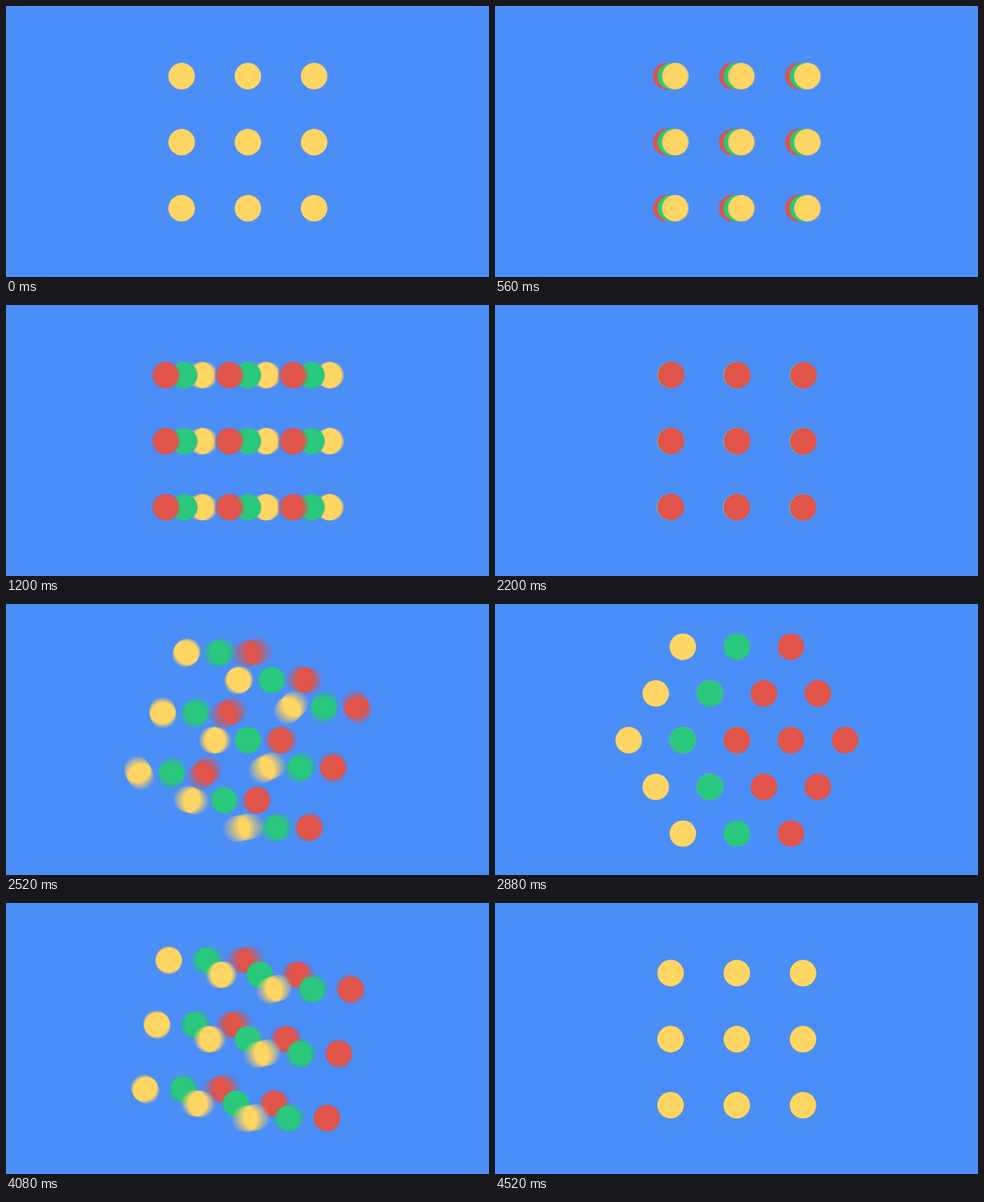
Write an HTML page with a canvas that moves like this. It is 640 px wide and 360 px high and loops after 4.84 s.

```html
<!DOCTYPE html>
<html lang="en">
<head>
<meta charset="utf-8">
<title>Turning cube of dots</title>
<style>
  html, body { margin: 0; width: 100%; height: 100%; overflow: hidden; background: #4c8ef8; }
  canvas { display: block; width: 640px; height: 360px; }
</style>
</head>
<body>
<canvas id="stage" width="640" height="360"></canvas>
<script>
const W = 640, H = 360;
const LOOP = 4840, STEP = 40;
const CENTER_X = 320.5, CENTER_Y = 180.9;
const EDGE = 87.75, RADIUS = 17.6;
const BACKGROUND = '#4c8ef8';
const LAYER_COLORS = ['#ffd564', '#2ac87c', '#e0544a'];
const SAMPLES = 9, SHUTTER = 27;
const ISO = Math.atan(Math.SQRT2);

// Each move eases around its middle time, in ms.
const MOVES = [
  { mid: 950, length: 1430, turn: Math.PI, roll: 0 },
  { mid: 2510, length: 880, turn: ISO, roll: Math.PI / 4 },
  { mid: 3993, length: 1300, turn: Math.PI - ISO, roll: Math.PI / 4 }
];

const stage = document.getElementById('stage').getContext('2d');
const layer = document.createElement('canvas');
layer.width = W;
layer.height = H;
const scene = layer.getContext('2d');

function ease(u) {
  if (u <= 0) return 0;
  if (u >= 1) return 1;
  return u < 0.5 ? (2 * u) ** 4 / 2 : 1 - (2 - 2 * u) ** 4 / 2;
}

function poseAt(time) {
  let turn = -Math.PI, roll = Math.PI / 2;
  for (const move of MOVES) {
    const p = ease((time - move.mid) / move.length + 0.5);
    turn += move.turn * p;
    roll -= move.roll * p;
  }
  return { turn, roll };
}

// Projects a 3 x 3 x 3 lattice without perspective, nearest dots last.
function projectDots({ turn, roll }) {
  const st = Math.sin(turn), ct = Math.cos(turn);
  const sr = Math.sin(roll), cr = Math.cos(roll);
  const dots = [];
  for (let n = -1; n <= 1; n++) {
    for (let a = -1; a <= 1; a++) {
      for (let b = -1; b <= 1; b++) {
        dots.push({
          x: n * st - a * ct * cr + b * ct * sr,
          y: a * sr + b * cr,
          z: n * ct + a * st * cr - b * st * sr,
          color: LAYER_COLORS[n + 1]
        });
      }
    }
  }
  return dots.sort((p, q) => p.z - q.z);
}

// Dots fully hidden by a nearer one are skipped to keep edges clean.
function isCovered(dot, index, dots) {
  return dots.slice(index + 1).some(other =>
    Math.hypot(other.x - dot.x, other.y - dot.y) < 0.0005);
}

function drawScene(pose) {
  scene.fillStyle = BACKGROUND;
  scene.fillRect(0, 0, W, H);
  projectDots(pose).forEach((dot, index, dots) => {
    if (isCovered(dot, index, dots)) return;
    scene.fillStyle = dot.color;
    scene.beginPath();
    scene.arc(CENTER_X + dot.x * EDGE, CENTER_Y + dot.y * EDGE, RADIUS, 0, 2 * Math.PI);
    scene.fill();
  });
}

// Motion blur: a running average over the open shutter.
function drawFrame(time) {
  const first = poseAt(time - SHUTTER / 2);
  const last = poseAt(time + SHUTTER / 2);
  const count = first.turn === last.turn ? 1 : SAMPLES;
  for (let k = 0; k < count; k++) {
    const offset = count > 1 ? SHUTTER * (k / (count - 1) - 0.5) : 0;
    drawScene(poseAt(time + offset));
    stage.globalAlpha = 1 / (k + 1);
    stage.drawImage(layer, 0, 0);
  }
}

const start = performance.now();
let shown = -1;

function tick() {
  const time = (performance.now() - start) % LOOP;
  const frame = Math.floor(time / STEP);
  if (frame !== shown) {
    shown = frame;
    drawFrame(frame * STEP);
  }
  requestAnimationFrame(tick);
}

tick();
</script>
</body>
</html>
```
